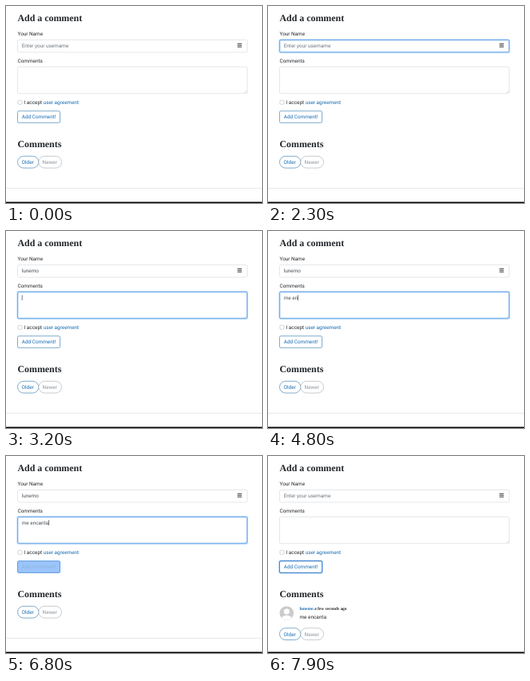
An HTML page for the animation above (9000 ms loop, 320x247 px).

```html
<!DOCTYPE html>
<html lang="en">
<head>
<meta charset="utf-8">
<title>Add a comment</title>
<style>
  html, body { margin: 0; width: 100%; height: 100%; overflow: hidden; background: #fff; }
  svg { display: block; width: 320px; height: 247px; }
  text { font: 6.4px Roboto, sans-serif; fill: #24282c; white-space: pre; text-rendering: geometricPrecision; }
  .title { font: bold 11.9px "Liberation Serif", serif; fill: #212529; }
  .meta { font: bold 5.4px "Liberation Serif", serif; }
  .link { fill: #176cb3; }
  .hint { fill: #6c757d; }
  .typed { fill: #495057; }
  .muted { fill: #8d959c; }
  .box { fill: #fff; stroke: #dde1e4; stroke-width: .8; }
  .outline { fill: #fff; stroke: #5f97c0; stroke-width: .8; }
  .ring { fill: none; stroke: #c4defb; stroke-width: 2.4; }
  .edge { fill: none; stroke: #6aaae6; stroke-width: .9; }
  .caret { fill: #222; }
</style>
</head>
<body>
<svg viewBox="0 0 320 247">
  <text class="title" x="14.5" y="18.7">Add a comment</text>

  <text x="14.5" y="37">Your Name</text>
  <rect class="box" x="14.5" y="42.5" width="287" height="15.5" rx="1.6"/>
  <g id="nameFocus">
    <rect class="ring" x="14.5" y="42.5" width="287" height="15.5" rx="1.6"/>
    <rect class="edge" x="14.5" y="42.5" width="287" height="15.5" rx="1.6"/>
  </g>
  <text id="nameHint" class="hint" x="19.7" y="52.4">Enter your username</text>
  <text id="nameText" class="typed" x="19.7" y="52.4"></text>
  <rect id="nameCaret" class="caret" y="46.7" width=".6" height="7"/>
  <path id="iconIdle" d="M289.3 47.2h5.4M289.3 49.2h5.4M289.3 51.2h5.4" stroke="#3c3c3c" stroke-width="1.1"/>
  <g id="iconHover">
    <rect x="289" y="46.5" width="6" height="5.5" rx=".7"/>
    <path d="M290.2 49.8h3.6" stroke="#fff" stroke-width=".7" stroke-dasharray=".7 .75"/>
  </g>

  <text x="14.5" y="70.9">Comments</text>
  <rect class="box" x="14.5" y="76.3" width="287" height="33.4" rx="1.6"/>
  <path d="M298 109l2.8-2.8M299.6 109l1.2-1.2" stroke="#aaa" stroke-width=".4"/>
  <g id="bodyFocus">
    <rect class="ring" x="14.5" y="76.3" width="287" height="33.4" rx="1.6"/>
    <rect class="edge" x="14.5" y="76.3" width="287" height="33.4" rx="1.6"/>
  </g>
  <text id="bodyText" class="typed" x="19.7" y="86"></text>
  <rect id="bodyCaret" class="caret" y="80.3" width=".6" height="6.7"/>

  <rect x="14.9" y="118.3" width="5" height="5" rx="1.2" fill="#fff" stroke="#bfc4c8" stroke-width=".7"/>
  <text x="22.5" y="123">I accept <tspan class="link">user agreement</tspan></text>

  <rect id="buttonRing" class="ring" x="14.5" y="131.7" width="53" height="14.7" rx="1.6" style="stroke:#a4cbfb"/>
  <rect class="outline" x="14.5" y="131.7" width="53" height="14.7" rx="1.6"/>
  <text class="link" x="19.8" y="141.3">Add Comment!</text>
  <g id="buttonFill">
    <rect x="14.1" y="131.3" width="53.8" height="15.5" rx="2" fill="#3a8bfb"/>
    <text x="19.8" y="141.3" style="fill:#fff">Add Comment!</text>
  </g>
  <rect id="buttonEdge" class="edge" x="14.5" y="131.7" width="53" height="14.7" rx="1.6" style="stroke:#3d84cf"/>

  <text class="title" x="14.5" y="177">Comments</text>
  <g id="post">
    <clipPath id="round"><circle cx="23.3" cy="197" r="8.8"/></clipPath>
    <g clip-path="url(#round)">
      <rect x="14" y="188" width="19" height="18" fill="#cbcbcb"/>
      <circle cx="23.3" cy="195" r="3.6" fill="#fff"/>
      <ellipse cx="23.3" cy="204.6" rx="6.6" ry="4.8" fill="#fff"/>
    </g>
    <text class="meta" x="39.5" y="193.3"><tspan class="link">lunemo</tspan> a few seconds ago</text>
    <text x="39.5" y="204.2">me encanta</text>
  </g>
  <g id="pager">
    <rect class="outline" x="14.5" y="188.3" width="26.3" height="14.8" rx="7.4"/>
    <rect class="outline" x="40.8" y="188.3" width="28.7" height="14.8" rx="7.4" style="stroke:#b9bfc4"/>
    <text class="link" x="19.6" y="198">Older</text>
    <text class="muted" x="45.6" y="198">Newer</text>
  </g>
  <path id="footer" d="M0 228.5h320" stroke="#e9e9e9"/>
  <rect y="245.6" width="320" height="1.4"/>
</svg>
<script>
const LOOP = 9000, STEP = 100, BLINK = 500;
const NAME_FOCUS = 1800, BODY_FOCUS = 3100, HOVER = 6800, PRESS = 7300, SENT = 7400, LEAVE = 7800;

const fields = [
  { id: "name", value: "lunemo", from: NAME_FOCUS, to: BODY_FOCUS,
    keys: [2400, 2500, 2600, 2700, 2800, 2900] },
  { id: "body", value: "me encanta", from: BODY_FOCUS, to: PRESS,
    keys: [3700, 3800, 3900, 4300, 4800, 4900, 5100, 5500, 5700, 5800] }
];

const el = id => document.getElementById(id);
const show = (id, visible) => { el(id).style.display = visible ? "" : "none"; };
const fade = (id, amount) => { el(id).style.opacity = amount; };

// Transitions pass through one halfway step.
const ramp = (t, start) => t < start ? 0 : t < start + STEP ? 0.5 : 1;
const between = (t, start, end) => ramp(t, start) - ramp(t, end);

function drawField({ id, value, from, to, keys }, t) {
  const count = t < SENT ? keys.filter(key => key <= t).length : 0;
  const text = el(id + "Text");
  const caret = el(id + "Caret");
  text.textContent = value.slice(0, count);
  fade(id + "Focus", between(t, from, to));

  const lastInput = count ? keys[count - 1] : from;
  const blinkOn = Math.floor((t - lastInput) / BLINK) % 2 === 0;
  show(id + "Caret", t >= from && t < to && blinkOn);
  caret.setAttribute("x", 19.8 + (count ? text.getComputedTextLength() : 0));
  return count;
}

function draw(now) {
  const t = Math.floor(now % LOOP / STEP) * STEP;
  const [nameLength] = fields.map(field => drawField(field, t));
  show("nameHint", nameLength === 0);

  const iconHovered = t >= 1400 && t < NAME_FOCUS;
  show("iconHover", iconHovered);
  show("iconIdle", !iconHovered);

  fade("buttonFill", between(t, HOVER, LEAVE));
  fade("buttonRing", ramp(t, PRESS));
  fade("buttonEdge", ramp(t, PRESS));

  const sent = t >= SENT;
  show("post", sent);
  show("footer", !sent);
  el("pager").setAttribute("transform", `translate(0 ${sent ? 27.5 : 0})`);
}

const start = performance.now();
function tick() {
  draw(performance.now() - start);
  requestAnimationFrame(tick);
}
tick();
</script>
</body>
</html>
```
